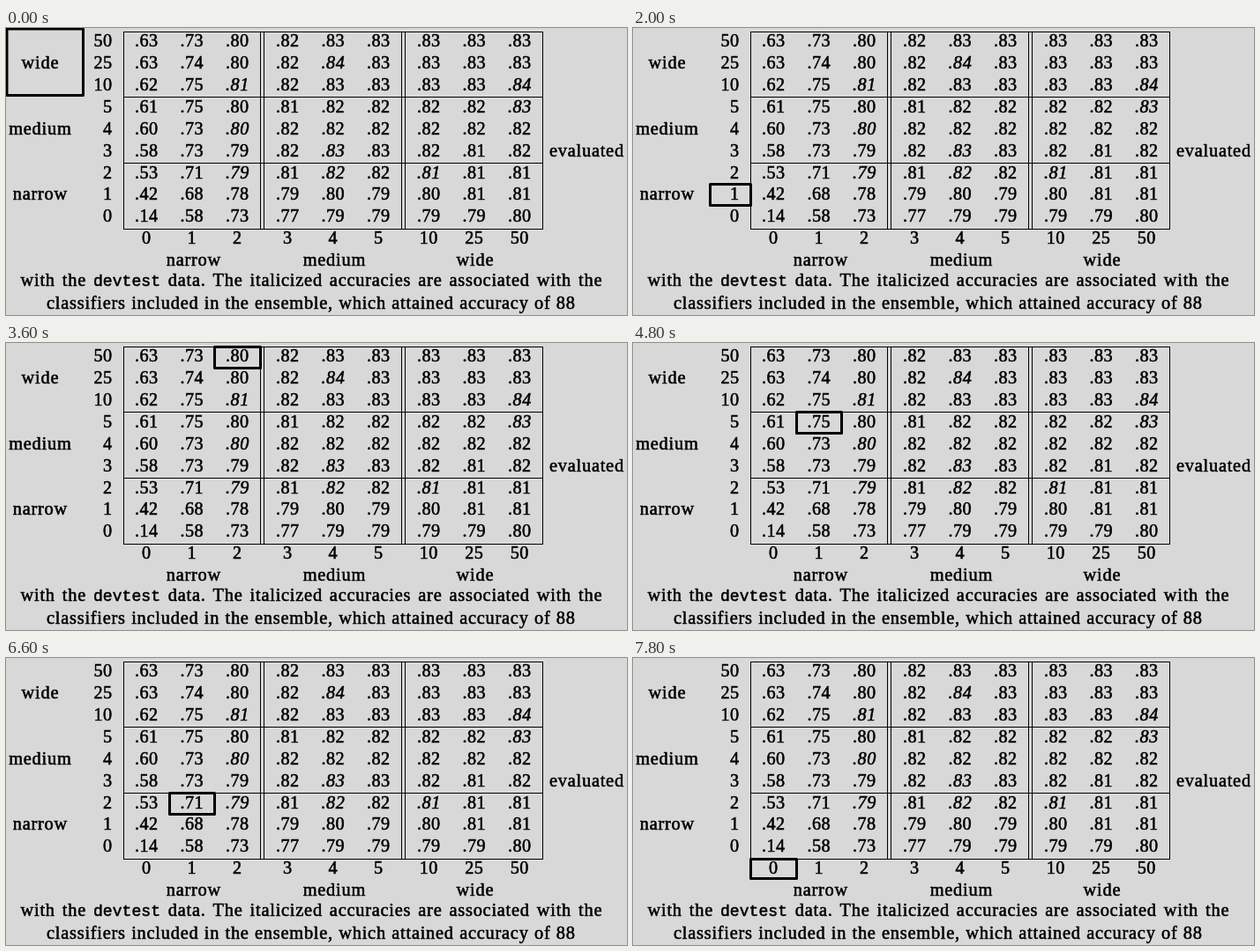
These frames come from a looping animation (704 by 326 pixels, 8000 ms). An HTML page with a canvas:

```html
<!DOCTYPE html>
<html lang="en">
<head>
<meta charset="utf-8">
<title>Accuracy table</title>
<style>
html, body { margin: 0; width: 100%; height: 100%; overflow: hidden; background: #d8d8d8; }
canvas { display: block; width: 704px; height: 326px; }
</style>
</head>
<body>
<canvas id="stage"></canvas>
<script>
const W = 704, H = 326, STEP = 200;
const canvas = document.getElementById('stage');
const ctx = canvas.getContext('2d');
const dpr = window.devicePixelRatio || 1;
canvas.width = W * dpr;
canvas.height = H * dpr;

const SERIF = '"Liberation Serif", serif';
const WORD = { font: `20.4px ${SERIF}`, spacing: 0.75 };
const DIGIT = { font: `20.2px ${SERIF}`, spacing: 0.4 };
const ITALIC = { font: `italic 20.2px ${SERIF}`, spacing: 0.5 };
const MONO = { font: '18.1px "Liberation Mono", monospace', spacing: 0 };

// Row label, then its entries; an asterisk marks an italic one.
const TABLE = `
50 .63 .73 .80 .82 .83 .83 .83 .83 .83
25 .63 .74 .80 .82 .84* .83 .83 .83 .83
10 .62 .75 .81* .82 .83 .83 .83 .83 .84*
5 .61 .75 .80 .81 .82 .82 .82 .82 .83*
4 .60 .73 .80* .82 .82 .82 .82 .82 .82
3 .58 .73 .79 .82 .83* .83 .82 .81 .82
2 .53 .71 .79* .81 .82* .82 .81* .81 .81
1 .42 .68 .78 .79 .80 .79 .80 .81 .81
0 .14 .58 .73 .77 .79 .79 .79 .79 .80`.trim().split('\n').map(row => row.split(' '));
const GROUPS = ['wide', 'medium', 'narrow'];

// Rows and columns come in blocks of three.
const block = i => Math.floor(i / 3);
const snap = v => Math.floor(v) + 0.5;
const cellX = c => 146 + 160 * block(c) + 51.5 * (c % 3);
const baseline = r => 21.4 + 24.85 * r;
const rowEdge = r => snap(4.2 + 74.7 * block(r) + 24 * (r % 3));
const colEdge = c => snap(133.5 + 51.7 * c);
const LABEL_X = 87.5, BOTTOM = 250.5;

function buildBoxes() {
  const list = GROUPS.map((_, i) => [1, 1 + 75.5 * i, LABEL_X, i < 2 ? 76.5 + 75.5 * i : BOTTOM]);
  TABLE.forEach((_, r) => {
    list.push([LABEL_X, rowEdge(r), colEdge(0), r < 8 ? rowEdge(r + 1) : BOTTOM]);
  });
  for (let i = 0; i < 27; i++) {
    const c = block(i) % 3, r = 3 * Math.floor(i / 9) + i % 3;
    list.push([colEdge(c), rowEdge(r), colEdge(c + 1), rowEdge(r + 1)]);
  }
  list.push([colEdge(0), rowEdge(9), colEdge(1), BOTTOM]);
  return list;
}
const boxes = buildBoxes();

function measure(str, style) {
  ctx.font = style.font;
  ctx.letterSpacing = style.spacing + 'px';
  return ctx.measureText(str).width - style.spacing;
}

// align: 0 left, 0.5 centre, 1 right
function text(str, x, y, style, align = 0) {
  const left = x - align * measure(str, style);
  ctx.lineWidth = 0.55;
  ctx.fillText(str, left, y);
  ctx.strokeText(str, left, y);
}

function justify(line, left, right, y) {
  const words = line.split(' ').map(str => {
    const style = str === 'devtest' ? MONO : WORD;
    return { str, style, width: measure(str, style) };
  });
  const used = words.reduce((sum, w) => sum + w.width, 0);
  const gap = (right - left - used) / (words.length - 1);
  let x = left;
  for (const w of words) {
    text(w.str, x, y, w.style);
    x += w.width + gap;
  }
}

function drawGrid() {
  for (let i = 0; i < 4; i++) ctx.fillRect(133, Math.floor(rowEdge(3 * i)), 476, 1);
  for (let i = 0; i < 3; i++) {
    const x = Math.floor(133 + 159.5 * i);
    ctx.fillRect(x, 4, 1, 225);
    ctx.fillRect(x + 156 - (i === 0), 4, 1, 225);
  }
}

function drawTable() {
  TABLE.forEach(([label, ...values], r) => {
    const y = baseline(r);
    text(label, 120, y, DIGIT, 1);
    text(label, cellX(8 - r) + 13, 245, DIGIT, 0.5);
    values.forEach((v, c) => {
      text(v.replace('*', ''), cellX(c), y, v.endsWith('*') ? ITALIC : DIGIT);
    });
  });
  GROUPS.forEach((name, i) => {
    text(name, 38.5, baseline(1 + 3 * i), WORD, 0.5);
    text(name, 531.5 - 159.5 * i, 270, WORD, 0.5);
  });
  text('evaluated', 616, baseline(5), WORD);
}

function drawCaption() {
  justify('with the devtest data. The italicized accuracies are associated with the', 16.5, 675.5, 293);
  justify('classifiers included in the ensemble, which attained accuracy of 88', 46, 645, 319);
}

function draw(time) {
  ctx.setTransform(dpr, 0, 0, dpr, 0, 0);
  ctx.fillStyle = '#d8d8d8';
  ctx.fillRect(0, 0, W, H);
  ctx.fillStyle = ctx.strokeStyle = '#000';
  ctx.lineJoin = 'round';
  drawGrid();
  drawTable();
  drawCaption();
  const [x0, y0, x1, y1] = boxes[Math.floor(time / STEP) % boxes.length];
  ctx.lineWidth = 3;
  ctx.strokeRect(x0, y0, x1 - x0, y1 - y0);
}

const start = performance.now();
function tick() {
  draw(performance.now() - start);
  requestAnimationFrame(tick);
}
tick();
</script>
</body>
</html>
```
